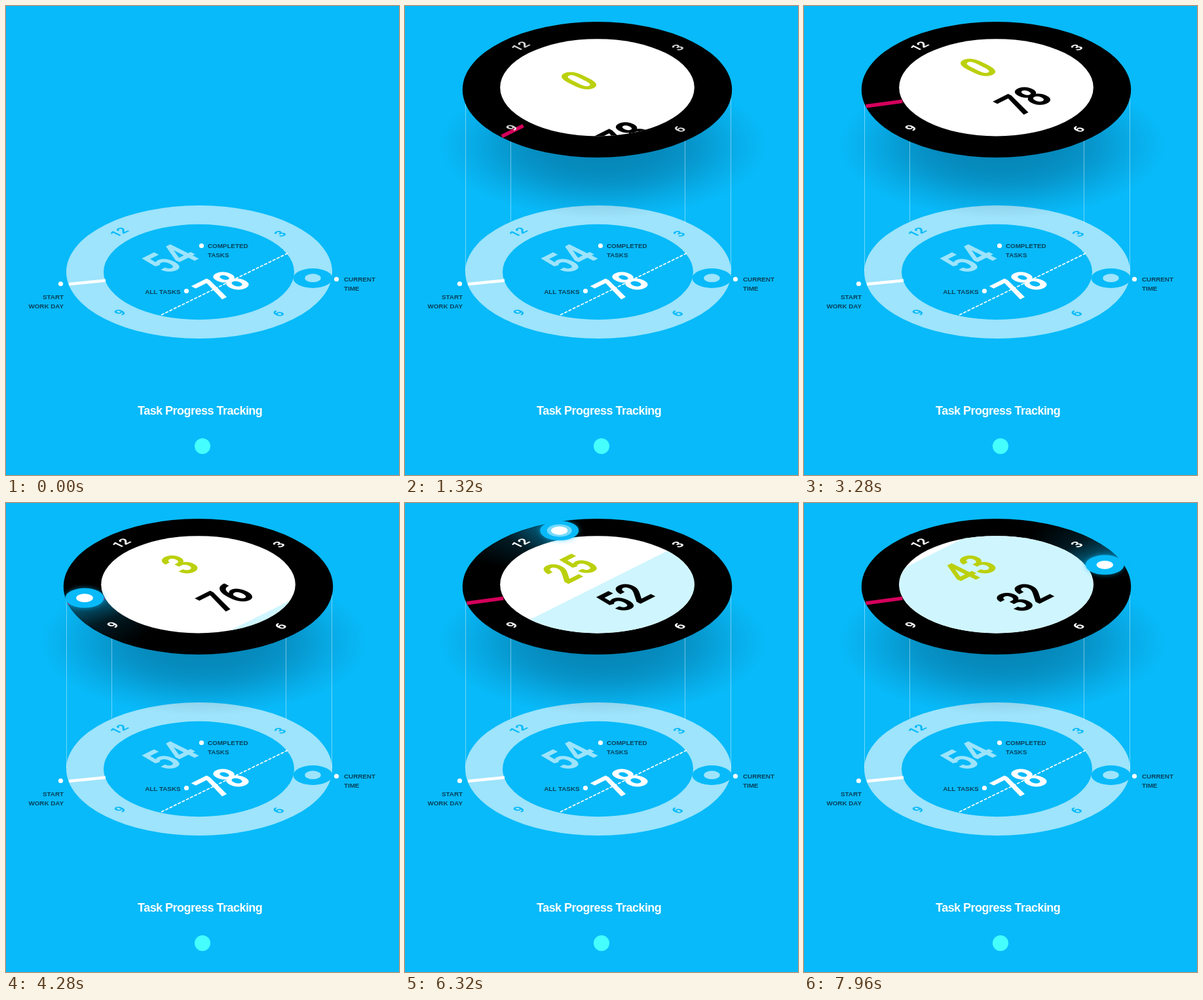
Animation, 600 px wide and 715 px high, one loop 8 s. Source, as an HTML page with a canvas:

```html
<!DOCTYPE html>
<html lang="en">
<head>
<meta charset="utf-8">
<title>Task Progress Tracking</title>
<style>
html, body { margin: 0; width: 100%; height: 100%; overflow: hidden; background: #08baf9; }
canvas { display: block; }
</style>
</head>
<body>
<canvas id="stage" width="600" height="715"></canvas>
<script>
const ctx = document.getElementById('stage').getContext('2d');
const LOOP = 8000;
const BLUE = '#08baf9', PALE = '#9de4fc', INK = '#07405a', WHITE = '#fff';
const SANS = '"Liberation Sans", Arial, sans-serif';
const DIGITS = 'Roboto, sans-serif';
const CX = 293.5, DISC_Y = 127.5, HOLE_Y = 124.3, TRACK_Y = 126;
const TRACK_R = 177.5, HOLE_R = 148.3, DISC_R = 205.7;
const RAD = Math.PI / 180;

const clamp = x => Math.max(0, Math.min(1, x));
const span = (t, a, b) => clamp((t - a) / (b - a));
const inOutQuad = p => p < .5 ? 2 * p * p : 1 - 2 * (1 - p) ** 2;
const settle = (t, at) => 110 * Math.exp(-.0028 * (t - at));

function scoped(draw) {
  ctx.save();
  draw();
  ctx.restore();
}

function oval(x, y, rx, color, ry = rx / 2) {
  ctx.beginPath();
  ctx.ellipse(x, y, rx, ry, 0, 0, 7);
  ctx.fillStyle = color;
  ctx.fill();
}

function line(x1, y1, x2, y2, color, width) {
  ctx.beginPath();
  ctx.moveTo(x1, y1);
  ctx.lineTo(x2, y2);
  ctx.strokeStyle = color;
  ctx.lineWidth = width;
  ctx.stroke();
}

function label(text, x, y, align = 'left') {
  ctx.font = `bold 9.8px ${SANS}`;
  ctx.textAlign = align;
  ctx.fillStyle = INK;
  ctx.fillText(text, x, y);
}

// Text lying on the tilted plane; y is the middle of the digit height.
function flatText(text, x, y, size, color, align = 'center', narrow = 1) {
  scoped(() => {
    ctx.transform(.707 * narrow, -.3535 * narrow, .707, .3535, x, y);
    ctx.font = `bold ${size}px ${DIGITS}`;
    ctx.textAlign = align;
    ctx.fillStyle = color;
    ctx.fillText(text, 0, size * .3555);
  });
}

const bigNumber = (n, x, y, color, align) => flatText(n, x, y, 87, color, align, .76);
const dialNumber = (n, x, y, color) => flatText(n, x, y, 25, color);

function drawBase() {
  oval(295, 405.5, 203, PALE);
  oval(294.5, 405.5, 145.5, BLUE);
  dialNumber('12', 172.5, 344.5, BLUE);
  dialNumber('3', 418.5, 347, BLUE);
  dialNumber('6', 415.5, 468.5, BLUE);
  dialNumber('9', 174, 467, BLUE);
  line(96, 424, 152, 418.5, WHITE, 4.6);
  oval(468.5, 415, 30, BLUE);
  oval(468.5, 414.7, 12.2, PALE, 6.4);
  bigNumber(54, 251, 385, PALE);
  bigNumber(78, 330, 425.5, WHITE);
  scoped(() => {
    ctx.setLineDash([5, 2]);
    line(237, 471, 430, 377, WHITE, 1.7);
  });

  label('COMPLETED', 308, 369);
  label('TASKS', 308, 383);
  label('CURRENT', 516, 420);
  label('TIME', 516, 434);
  label('ALL TASKS', 266.5, 439, 'right');
  label('START', 88, 447, 'right');
  label('WORK DAY', 88, 461, 'right');
  for (const [x, y] of [[298.5, 365.5], [275.5, 434.5], [504.5, 416.5], [83.5, 423.5]])
    oval(x, y, 3.6, WHITE, 3.6);

  scoped(() => {
    ctx.font = `bold 18px ${SANS}`;
    ctx.letterSpacing = '-0.52px';
    ctx.textAlign = 'left';
    ctx.fillStyle = WHITE;
    ctx.fillText('Task Progress Tracking', 201, 623);
  });
  oval(300, 671, 12, '#45ffff', 12);
}

function drawShadow(strength) {
  scoped(() => {
    ctx.translate(302, 212);
    ctx.scale(250, 112);
    const g = ctx.createRadialGradient(0, 0, 0, 0, 0, 1);
    [.31, .31, .3, .28, .24, .18, .11, .05, 0].forEach((a, i) =>
      g.addColorStop(i / 8, `rgba(0,20,40,${a * strength})`));
    oval(0, 0, 1, g, 1);
  });
}

function drawGuides(t) {
  const length = Math.max(0, Math.min(275, .32 * (t - 200)));
  if (!length) return;
  for (const [x, y] of [[92.5, 404], [161.5, 328], [427.5, 331], [497.5, 404]])
    line(x, y, x, Math.max(130, y - length), 'rgba(255,255,255,.42)', 1);
}

// Degrees clockwise from the left end of the dial.
function markerAngle(t) {
  const d = t - 5040;
  return d < 0 ? -15 + 20.5 * span(t, 3480, 5040) ** 3
               : 5.5 + .05 * d + 8.8e-7 * d * d;
}

function fillEdge(t) {
  const d = t - 5040;
  return d < 0 ? 148 - 53 * span(t, 3446, 5040) ** 2
               : 95 - .0665 * d - 4.2e-6 * d * d;
}

function drawFace(t) {
  scoped(() => {
    ctx.beginPath();
    ctx.ellipse(CX, HOLE_Y, HOLE_R, HOLE_R / 2, 0, 0, 7);
    ctx.clip();
    oval(CX, HOLE_Y + settle(t, 690), 204, WHITE);

    const edge = fillEdge(t);
    if (edge < 148) scoped(() => {
      ctx.transform(.707, -.3535, .707, .3535, CX, HOLE_Y);
      ctx.fillStyle = '#cff6ff';
      ctx.fillRect(-200, edge, 400, 400);
    });

    const done = Math.max(0, Math.floor((t - 4000) / 91.5));
    const left = 78 - Math.max(0, Math.floor((t - 4100) * .012));
    bigNumber(done, 279, 86.7 + settle(t, 720), '#bbd00c', 'right');
    bigNumber(left, 335.5, 143.7 + settle(t, 1064), '#000');
  });
}

function drawStart(t) {
  const grow = span(t, 1000, 1400);
  if (!grow) return;
  const a = (45 - 30 * inOutQuad(span(t, 1500, 3300))) * RAD;
  const at = r => [CX - r * Math.cos(a), TRACK_Y + r / 2 * Math.sin(a)];
  const [x1, y1] = at(206);
  const [x2, y2] = at(HOLE_R);
  line(x1, y1, x1 + (x2 - x1) * grow, y1 + (y2 - y1) * grow, '#d4005c', 5.5);
}

function clipRing() {
  ctx.beginPath();
  ctx.ellipse(CX, DISC_Y, DISC_R, DISC_R / 2, 0, 0, 7);
  ctx.closePath();
  ctx.moveTo(CX + HOLE_R, HOLE_Y);
  ctx.ellipse(CX, HOLE_Y, HOLE_R, HOLE_R / 2, 0, 0, 2 * Math.PI);
  ctx.clip('evenodd');
}

function drawTrail(angle, alpha) {
  scoped(() => {
    ctx.translate(CX, TRACK_Y);
    ctx.scale(1, .5);
    const tail = 50;
    const g = ctx.createConicGradient((180 + angle - tail) * RAD, 0, 0);
    const tint = a => `rgba(8,186,249,${a * alpha})`;
    g.addColorStop(0, tint(0));
    g.addColorStop(tail / 720, tint(.14));
    g.addColorStop(tail / 360, tint(.6));
    g.addColorStop(tail / 360 + .001, tint(0));
    g.addColorStop(1, tint(0));
    oval(0, 0, 230, g, 230);
  });
}

function drawMarker(t, angle, size) {
  const a = angle * RAD;
  const phase = ((t - 5040) / 1280 + 3.6) % 1;
  const fade = .6 * (1 - span(phase, .6, .85));
  scoped(() => {
    ctx.translate(CX - TRACK_R * Math.cos(a), TRACK_Y - TRACK_R / 2 * Math.sin(a));
    ctx.scale(size, size);
    ctx.shadowColor = 'rgba(8,186,249,.6)';
    ctx.shadowBlur = 7;
    oval(0, 0, 29.5, BLUE, 15);
    ctx.shadowBlur = 0;
    oval(0, 0, 13 + 10 * phase, `rgba(190,240,255,${fade})`);
    oval(0, 0, 12.6, WHITE, 6.4);
  });
}

function drawDisc(t, scale) {
  scoped(() => {
    ctx.translate(CX, DISC_Y);
    ctx.scale(scale, scale);
    ctx.translate(-CX, -DISC_Y);
    oval(CX, DISC_Y, DISC_R, '#000', 103.4);
    drawFace(t);

    const size = 1 - (1 - span(t, 3480, 3900)) ** 3;
    const angle = markerAngle(t);
    if (size) scoped(() => {
      clipRing();
      drawTrail(angle, size);
    });
    drawStart(t);

    ctx.globalAlpha = span(t, 900, 1400);
    dialNumber('12', 176, 61, WHITE);
    dialNumber('3', 416.5, 63, WHITE);
    dialNumber('6', 419, 187.5, WHITE);
    dialNumber('9', 163, 185.7, WHITE);
    ctx.globalAlpha = 1;
    if (size) drawMarker(t, angle, size);
  });
}

function draw(t) {
  ctx.fillStyle = BLUE;
  ctx.fillRect(0, 0, 600, 715);
  drawBase();
  const scale = 1 - Math.exp(-.0073 * Math.max(0, t - 30));
  if (!scale) return;
  drawShadow(scale * scale);
  drawGuides(t);
  drawDisc(t, scale);
}

const begin = performance.now();
function tick() {
  draw((performance.now() - begin) % LOOP);
  requestAnimationFrame(tick);
}
tick();
</script>
</body>
</html>
```
